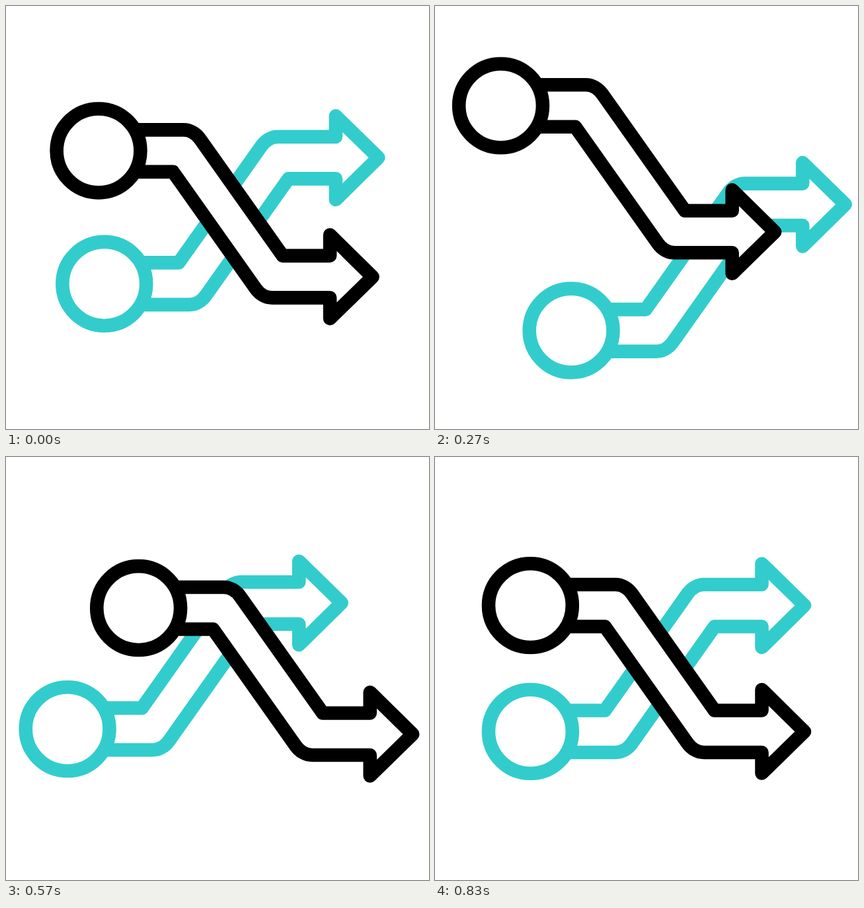
Write an HTML page without scripts that moves like this. It is 640x640 px and loops after 1670 ms.

```html
<!DOCTYPE html>
<html lang="en">
<head>
<meta charset="utf-8">
<title>Crossing arrows</title>
<style>
  @property --k { syntax: "<number>"; inherits: true; initial-value: 0; }

  html, body { margin: 0; height: 100%; overflow: hidden; background: #fff; }
  svg { display: block; width: 100%; height: 100%; }

  /* --k counts 30 fps ticks; each arrow runs home > A > B > home on smooth curves */
  .arrow {
    fill: #fff;
    stroke-width: 20.6;
    stroke-linejoin: round;
    stroke-linecap: round;
    animation: tick 1.67s infinite;

    /* progress of the three legs */
    --s1: clamp(0, (var(--k) + 1) / var(--t1), 1);
    --s2: clamp(0, (var(--k) - var(--from2)) / var(--t2), 1);
    --s3: clamp(0, (var(--k) - 15.8) / 9, 1);

    /* eased curve parameters and their complements */
    --u1: (var(--s1) + var(--s1) * (1 - var(--s1)) * (-.22 - .6 * var(--s1)));
    --u2: (var(--s2) + var(--s2) * (1 - var(--s2)) * (-.22 + .6 * var(--s2)));
    --u3: (var(--s3) + var(--s3) * (1 - var(--s3)) * (-.12 + .75 * var(--s3)));
    --w1: (1 - var(--u1));
    --w2: (1 - var(--u2));
    --w3: (1 - var(--u3));

    /* cubic Bezier weights of A and B summed over the legs */
    --a: (
      var(--u1) * (.5 * var(--w1) * var(--w1) + 3 * var(--w1) * var(--u1) + var(--u1) * var(--u1))
      + var(--w2) * (var(--w2) * var(--w2) + 3 * var(--w2) * var(--u2) + .5 * var(--u2) * var(--u2))
      - 1 - .5 * var(--w3) * var(--w3) * var(--u3));
    --b: (
      var(--u2) * (.5 * var(--w2) * var(--w2) + 3 * var(--w2) * var(--u2) + var(--u2) * var(--u2))
      + var(--w3) * (var(--w3) * var(--w3) + 3 * var(--w3) * var(--u3) + .5 * var(--u3) * var(--u3))
      - 1 - .5 * var(--w1) * var(--u1) * var(--u1));

    transform: translate(
      calc(var(--a) * var(--ax) + var(--b) * var(--bx)),
      calc(var(--a) * var(--ay)));
  }
  .teal {
    stroke: #3cc;
    --t1: 7.87; --from2: 7.05; --t2: 9.35;
    --ax: 65.8px; --ay: 77px; --bx: -50px;
  }
  .black {
    stroke: #000;
    --t1: 7.2; --from2: 5.9; --t2: 10.3;
    --ax: -58px; --ay: -80px; --bx: 55.6px;
  }

  @keyframes tick {
    0% { --k: 0; animation-timing-function: step-end; }
    1.75% { --k: 1; animation-timing-function: steps(24); }
    49.65%, 100% { --k: 25; }
  }
</style>
</head>
<body>
<svg viewBox="0 0 640 640">
  <defs>
    <g id="shape">
      <path d="M190 193H273C283 193 292 198.5 298 207L423 383.5H494.5V352L559 415.5L494.5 478.5V447H407C397 447 388 441.5 382 433L257 256.5H190"/>
      <circle cx="144.4" cy="224.6" r="63.4"/>
    </g>
  </defs>
  <g class="arrow teal"><use href="#shape" transform="matrix(1 0 0 -1 0 640)"/></g>
  <g class="arrow black"><use href="#shape"/></g>
</svg>
</body>
</html>
```
